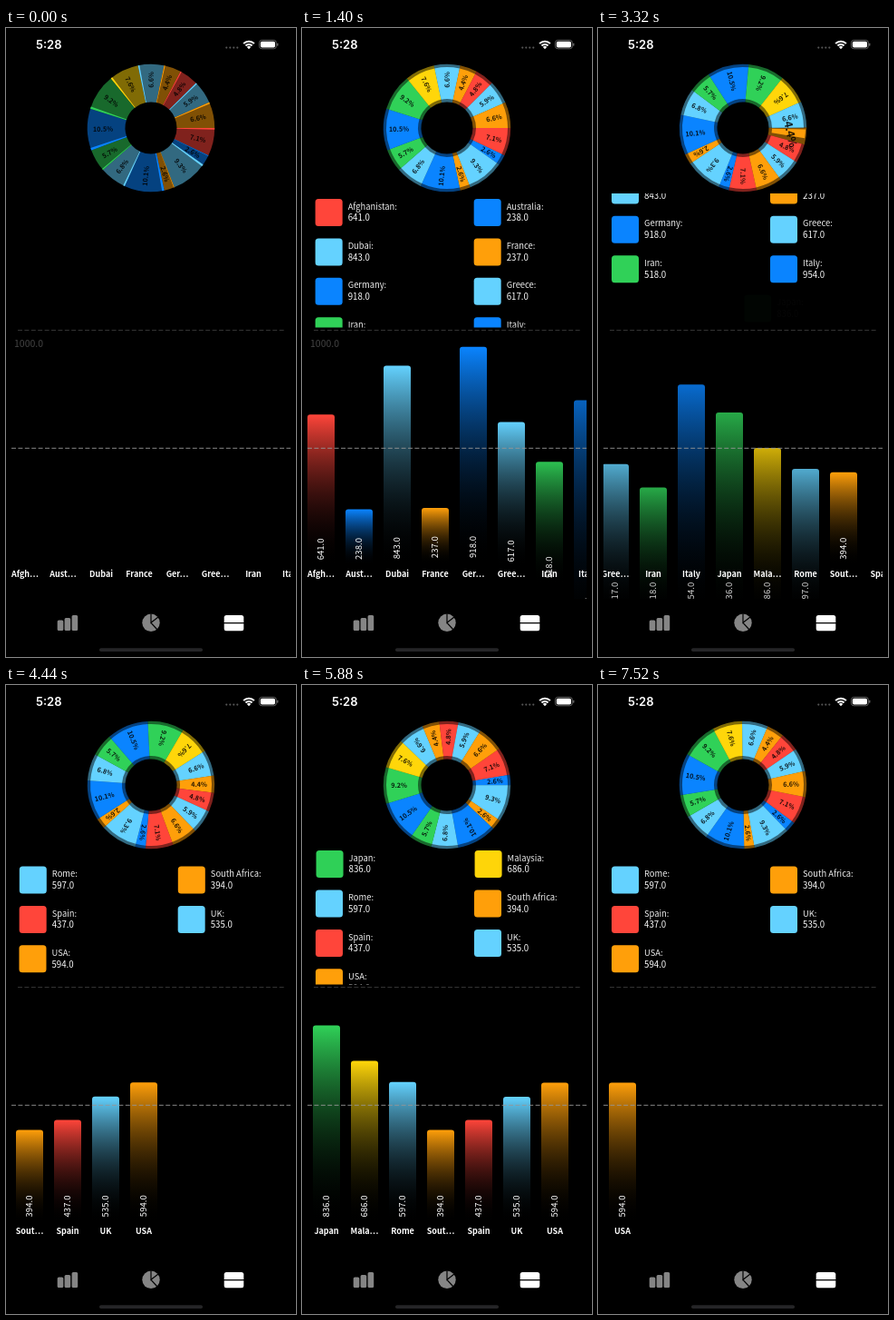
These frames come from a looping animation (320 px wide and 692 px high, 7.56 s). An HTML page with a canvas:

```html
<!DOCTYPE html>
<html lang="en">
<head>
<meta charset="utf-8">
<title>Country charts</title>
<style>
  html, body { margin: 0; width: 100%; height: 100%; overflow: hidden; background: #000; }
  canvas { display: block; width: 320px; height: 692px; }
</style>
</head>
<body>
<canvas id="stage"></canvas>
<script>
const LOOP = 7560;
const TAU = Math.PI * 2;
const FONT = '"Noto Sans CJK KR", "Noto Sans CJK JP", "Noto Sans CJK SC", "Noto Sans", sans-serif';
const RED = '#ff453a', BLUE = '#0a84ff', SKY = '#64d2ff';
const ORANGE = '#ff9f0a', GREEN = '#30d158', YELLOW = '#ffd60a';

const items = [
  ['Afghanistan', 641, RED, 'Afgh⋯'], ['Australia', 238, BLUE, 'Aust⋯'],
  ['Dubai', 843, SKY], ['France', 237, ORANGE],
  ['Germany', 918, BLUE, 'Ger⋯'], ['Greece', 617, SKY, 'Gree⋯'],
  ['Iran', 518, GREEN], ['Italy', 954, BLUE],
  ['Japan', 836, GREEN], ['Malaysia', 686, YELLOW, 'Mala⋯'],
  ['Rome', 597, SKY], ['South Africa', 394, ORANGE, 'Sout⋯'],
  ['Spain', 437, RED], ['UK', 535, SKY], ['USA', 594, ORANGE]
].map(([name, value, color, short = name]) => ({ name, value, color, short }));

const total = items.reduce((sum, item) => sum + item.value, 0);
let sum = 0;
for (const item of items) {
  item.from = sum / total * TAU;
  sum += item.value;
  item.to = sum / total * TAU;
  item.share = (item.value / total * 100).toFixed(1) + '%';
}

// Motion tracks: [time in ms, value]
const barScroll = [[1560, 0], [2160, 128], [3040, 212], [3400, 212], [4300, 457],
  [4880, 457], [5560, 330], [6200, 330], [7200, 582]];
const pieTurn = [[1540, 0], [2120, 90], [2500, 90], [3160, 77.5], [3700, 77.5], [4360, 69.5],
  [4880, 69.5], [5600, -34.7], [5960, -34.7], [7200, 11]];
const listScroll = [[2320, 0], [3280, 68], [3440, 68], [4200, 205.5],
  [4900, 205.5], [5580, 179.5], [5920, 179.5], [6600, 205.5]];
const selections = [
  { index: 4, start: 1980, end: 2620 },
  { index: 11, start: 3130, end: 3720 }
];

const canvas = document.getElementById('stage');
const ctx = canvas.getContext('2d');
const ratio = window.devicePixelRatio || 1;
canvas.width = 320 * ratio;
canvas.height = 692 * ratio;

const clamp = v => Math.max(0, Math.min(1, v));
const ease = v => (1 - Math.cos(Math.PI * clamp(v))) / 2;

function track(keys, t) {
  if (t <= keys[0][0]) return keys[0][1];
  for (let i = 1; i < keys.length; i++) {
    const [t0, a] = keys[i - 1], [t1, b] = keys[i];
    if (t <= t1) return a + (b - a) * ease((t - t0) / (t1 - t0));
  }
  return keys[keys.length - 1][1];
}

// Remaining share of a damped spring, 1 at the start and 0 at rest
function spring(ms) {
  if (ms <= 0) return 1;
  const s = ms / 1000, w = 6.46 * s;
  return Math.exp(-9.42 * s) * (Math.cos(w) + 1.458 * Math.sin(w));
}

function latest(starts, t) {
  return starts.reduce((found, s) => s <= t ? s : found, Infinity);
}

function barStarts(i) {
  if (i < 5) return [605 + 85 * i];
  if (i < 8) return [605 + 85 * i, 3095];
  if (i < 11) return [1957, 3095, 5040];
  return [[2640], [3480], [3600], [3700]][i - 11];
}

function listStarts(i) {
  if (i < 8) return [700];
  return i < 10 ? [3300, 5500] : [3500 + (i >> 1) * 40];
}

function text(str, x, y, size, { weight = 400, color = '#fff', align = 'left', font = FONT } = {}) {
  ctx.font = `${weight} ${size}px ${font}`;
  ctx.fillStyle = color;
  ctx.textAlign = align;
  ctx.fillText(str, x, y);
}

function box(x, y, w, h, r, fill) {
  ctx.fillStyle = fill;
  ctx.beginPath();
  ctx.roundRect(x, y, w, h, r);
  ctx.fill();
}

function line(points, color, width) {
  ctx.strokeStyle = color;
  ctx.lineWidth = width;
  ctx.beginPath();
  points.forEach(([x, y]) => ctx.lineTo(x, y));
  ctx.stroke();
}

function clipped(x, y, w, h, draw) {
  ctx.save();
  ctx.beginPath();
  ctx.rect(x, y, w, h);
  ctx.clip();
  draw();
  ctx.restore();
}

function slice(from, to, inner, outer, color, alpha = 1) {
  ctx.globalAlpha = alpha;
  ctx.fillStyle = color;
  ctx.beginPath();
  ctx.arc(0, 0, outer, from, to);
  ctx.arc(0, 0, inner, to, from, true);
  ctx.fill();
  ctx.globalAlpha = 1;
}

// Labels lie along the radius; lifting one enlarges it and turns it level with the pie
function pieLabel(item, lift) {
  const mid = (item.from + item.to) / 2;
  const flips = mid > Math.PI / 2 && mid < Math.PI * 1.5;
  const angle = flips ? mid - Math.PI : mid > Math.PI ? mid - TAU : mid;
  const scale = 1 + 0.65 * lift;
  ctx.save();
  ctx.translate(53 * Math.cos(mid), 53 * Math.sin(mid));
  ctx.rotate(angle * (1 - lift));
  ctx.scale(scale, scale);
  text(item.share, 0, 2.6, 7.2, { weight: 700, color: 'rgba(0,0,0,.85)', align: 'center' });
  ctx.restore();
}

function drawPie(t) {
  const sweep = 0.055 + 0.945 * ease(t / 1000);
  const inset = ease(t / 500);
  const inner = 28.5 + 3.5 * inset, outer = 70.2 - 3.2 * inset;
  const active = selections.find(s => t >= s.start && t < s.end);
  const chosen = active && items[active.index];

  ctx.save();
  ctx.translate(160, 110);
  ctx.rotate(track(pieTurn, t) * Math.PI / 180);
  for (const it of items) slice(it.from, it.to, 28.5, 70.2, it.color, 0.5);
  for (const it of items) {
    if (it !== chosen) slice(it.from, it.from + (it.to - it.from) * sweep, inner, outer, it.color);
  }
  for (const it of items) if (it !== chosen) pieLabel(it, 0);
  if (chosen) {
    const lift = ease((t - active.start) / 140) * ease((active.end - t) / 140);
    slice(chosen.from + 0.03 * lift, chosen.to - 0.1 * lift, 32, 67 + 2 * lift, chosen.color);
    pieLabel(chosen, lift);
  }
  ctx.restore();
}

function drawList(t) {
  const scroll = track(listScroll, t);
  clipped(0, 182, 320, 147.5, () => items.forEach((it, i) => {
    const y = 188 + 43.4 * (i >> 1) - scroll;
    const rest = spring(t - latest(listStarts(i), t));
    if (rest >= 1 || y < 158 || y > 330) return;
    const x = 15 + 175 * (i % 2) + 150 * rest;
    ctx.globalAlpha = clamp(1 - rest);
    box(x, y, 30, 30, 3.5, it.color);
    text(it.name + ':', x + 36, y + 11.6, 9.4, { weight: 300, color: '#eee' });
    text(it.value.toFixed(1), x + 36, y + 24.3, 9.7, { weight: 500 });
    ctx.globalAlpha = 1;
  }));
}

function drawBar(it, x, rest) {
  const top = 592 - 0.26 * it.value + 260 * rest;
  const bottom = 592 + 260 * rest;
  const fade = ctx.createLinearGradient(0, top, 0, bottom);
  fade.addColorStop(0, it.color);
  fade.addColorStop(1, 'rgba(0,0,0,0)');
  ctx.globalAlpha = clamp(1 - rest);
  box(x, top, 30, bottom - top, [3, 3, 0, 0], fade);
  ctx.save();
  ctx.translate(x + 18.4, 573.5 + 260 * rest);
  ctx.rotate(-Math.PI / 2);
  text(it.value.toFixed(1), 0, 0, 9.6, { align: 'center' });
  ctx.restore();
  ctx.globalAlpha = 1;
}

function drawChart(t) {
  const scroll = track(barScroll, t);
  clipped(6, 325, 308, 303, () => {
    text('1000.0', 9 - scroll, 350.5, 10.5, { color: '#444' });
    items.forEach((it, i) => {
      const x = 6 + 42 * i - scroll;
      if (x < -32 || x > 316) return;
      const rest = spring(t - latest(barStarts(i), t));
      if (rest < 1 && !(i < 4 && t > 2000)) drawBar(it, x, rest);
      text(it.short, x + 15, 603.6, 9, { weight: 700, align: 'center' });
    });
  });
  ctx.setLineDash([5, 2.4]);
  line([[13, 332.5], [308, 332.5]], '#333', 1);
  line([[6, 462.4], [314, 462.4]], 'rgba(150,150,150,.72)', 1.2);
  ctx.setLineDash([]);
}

function drawChrome() {
  text('5:28', 33, 23, 13, { weight: 600, font: 'Inter, Roboto, sans-serif' });
  for (let i = 0; i < 4; i++) box(242.2 + 4 * i, 20.5, 2.2, 2.2, 1.1, '#555');

  [9.3, 6].forEach(r => {
    ctx.strokeStyle = '#fff';
    ctx.lineWidth = 2.1;
    ctx.beginPath();
    ctx.arc(268, 23, r - 1, Math.PI * 1.25, Math.PI * 1.75);
    ctx.stroke();
  });
  ctx.fillStyle = '#fff';
  ctx.beginPath();
  ctx.moveTo(268, 23.2);
  ctx.arc(268, 23, 3, Math.PI * 1.25, Math.PI * 1.75);
  ctx.fill();

  ctx.strokeStyle = '#777';
  ctx.lineWidth = 0.8;
  ctx.beginPath();
  ctx.roundRect(279.4, 13.4, 19, 9.4, 3);
  ctx.stroke();
  box(280.8, 14.8, 16.2, 6.6, 1.7, '#fff');
  box(299.2, 16.7, 1.1, 3, 0.5, '#777');

  const gray = '#858585';
  box(56.7, 651.5, 6.6, 11.5, 1.5, gray);
  box(64.6, 649, 6.6, 14, 1.5, gray);
  box(72.6, 646, 6.6, 17, 1.5, gray);

  ctx.fillStyle = gray;
  ctx.beginPath();
  ctx.arc(160, 654.3, 9.7, 0, TAU);
  ctx.fill();
  line([[160, 644], [160, 654.3], [168, 648]], '#000', 1.2);
  line([[160, 654.3], [167, 662]], '#000', 1.2);

  box(240.7, 646, 21.6, 8, [2.5, 2.5, 0, 0], '#fff');
  box(240.7, 655.2, 21.6, 8, [0, 0, 2.5, 2.5], '#fff');
  box(103, 682.3, 114, 3.7, 1.8, '#252527');
}

function frame(now) {
  const t = now % LOOP;
  ctx.setTransform(ratio, 0, 0, ratio, 0, 0);
  ctx.fillStyle = '#000';
  ctx.fillRect(0, 0, 320, 692);
  drawPie(t);
  drawList(t);
  drawChart(t);
  drawChrome();
}

const begin = performance.now();
function tick() {
  frame(performance.now() - begin);
  requestAnimationFrame(tick);
}
tick();
</script>
</body>
</html>
```
